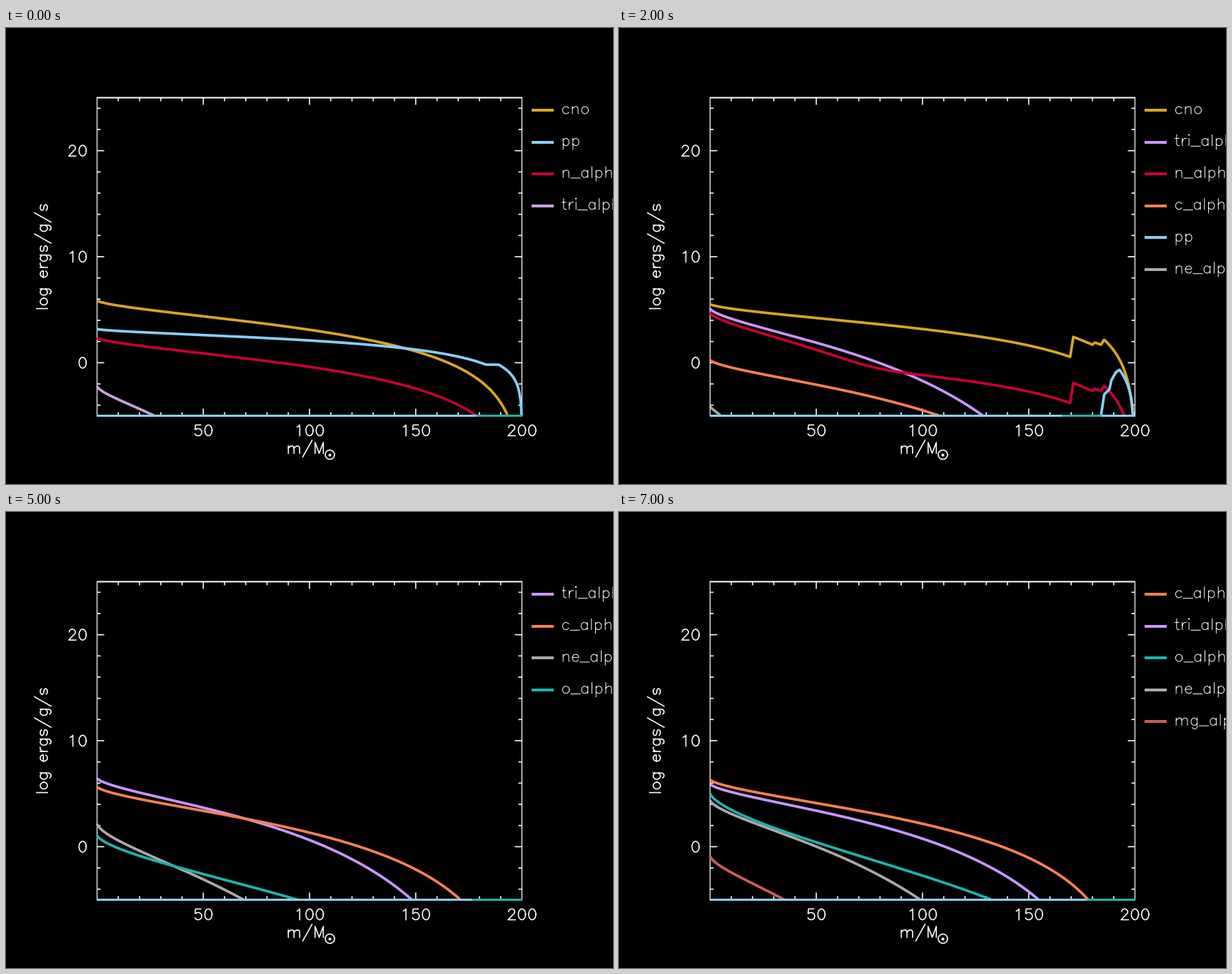
Write a matplotlib script that moves like this. It is 850 px wide and 638 px high and loops after 8000 ms.

```python
import numpy as np
import matplotlib.pyplot as plt
from matplotlib.animation import ArtistAnimation

W, H, DPI = 850, 638, 100
LEFT, RIGHT, TOP, BOTTOM = 127, 722, 97, 542
PX = 72 / DPI        # one pixel in points
UNIT = 0.72          # pixels per glyph unit
MASS, FLOOR, EMPTY = 200, -5, -9

COLORS = {
    "cno": "#daa520", "pp": "#87cefa", "n_alpha": "#c80032",
    "tri_alpha": "#c896ff", "c_alpha": "#ff7f50", "ne_alpha": "#a9a9a9",
    "o_alpha": "#20b2aa", "mg_alpha": "#cd5c5c",
}
PALE_LILAC = "#c8a2d8"
STACK = ["tri_alpha", "cno", "n_alpha", "c_alpha", "ne_alpha", "o_alpha",
         "mg_alpha", "pp"]

fig = plt.figure(figsize=(W / DPI, H / DPI), dpi=DPI, facecolor="black")
ax = fig.add_axes([0, 0, 1, 1])
ax.set_xlim(-0.5, W - 0.5)
ax.set_ylim(H - 0.5, -0.5)
ax.axis("off")


def to_x(m):
    return LEFT + m * (RIGHT - LEFT) / MASS


def to_y(e):
    return BOTTOM - (e - FLOOR) * (BOTTOM - TOP) / 30


# ---- stroke lettering: units with y up, baseline at 0 ----
def path(*v):
    return np.array(v, float).reshape(-1, 2)


def arc(cx, cy, rx, ry, a0, a1):
    a = np.radians(np.linspace(a0, a1, 25))
    return np.column_stack([cx + rx * np.cos(a), cy + ry * np.sin(a)])


def join(*parts):
    return np.vstack(parts)


stem = path(4, 0, 4, 14)
tall = path(4, 0, 4, 21)
arch = path(4, 10, 7, 13, 9, 14, 12, 14, 14, 13, 15, 10, 15, 0)
bowl = join(path(15, 11), arc(9, 7, 6, 7, 40, 320), path(15, 3))

# character: (advance, strokes)
GLYPHS = {
    " ": (16, []),
    "l": (8, [tall]),
    "i": (8, [stem, path(3, 21, 4, 22, 5, 21, 4, 20, 3, 21)]),
    "o": (19, [arc(9.5, 7, 6.5, 7, 0, 360)]),
    "c": (18, [arc(9.5, 7, 6.5, 7, 35, 325)]),
    "e": (18, [join(path(3, 8, 15, 8), arc(9.3, 7, 6.3, 7, 20, 325))]),
    "a": (19, [path(15, 0, 15, 14), bowl]),
    "g": (19, [join(path(15, 14), arc(10, -2, 5, 5, 0, -150)), bowl]),
    "p": (19, [path(4, 14, 4, -7),
               join(path(4, 11), arc(9.5, 7, 6, 7, 140, -140), path(4, 3))]),
    "n": (19, [stem, arch]),
    "h": (19, [tall, arch]),
    "m": (30, [stem, arch, arch + [11, 0]]),
    "r": (13, [stem, path(4, 8, 5, 11, 7, 13, 9, 14, 12, 14)]),
    "t": (12, [path(5, 21, 5, 4, 6, 1, 8, 0, 10, 0), path(2, 14, 9, 14)]),
    "s": (17, [join(arc(8.5, 10.5, 5.5, 3.5, 20, 250),
                    arc(8.5, 3.5, 5.5, 3.5, 70, -160))]),
    "/": (22, [path(20, 25, 2, -7)]),
    "_": (18, [path(0, -1, 18, -1)]),
    "M": (24, [path(4, 0, 4, 21, 12, 0, 20, 21, 20, 0)]),
    "0": (20, [arc(10, 10.5, 7, 10.5, 0, 360)]),
    "1": (20, [path(6, 17, 8, 18, 11, 21, 11, 0)]),
    "2": (20, [join(arc(10, 15.5, 6, 5.5, 175, -30), path(3, 0, 17, 0))]),
    "5": (20, [join(path(15, 21, 5, 21, 4, 12),
                    arc(10, 7, 7, 7, 125, -150))]),
}


def write(text, x, y, width=1.6, align=0, upright=False):
    """Draw text at baseline (x, y); align is the share of it left of x."""
    gap = path(np.nan, np.nan)
    pen, strokes = 0, []
    for ch in text:
        advance, parts = GLYPHS[ch]
        for part in parts:
            strokes += [part + [pen, 0], gap]
        pen += advance
    u, v = (np.vstack(strokes) - [align * pen, 0]).T * UNIT
    xs, ys = (x - v, y - u) if upright else (x + u, y - v)
    return ax.plot(xs, ys, color="white", lw=width * PX, snap=False)[0]


# ---- fixed parts ----
def segment(x0, y0, x1, y1, color="white", width=1.6, snap=False):
    return ax.plot([x0, x1], [y0, y1], color=color, lw=width * PX,
                   solid_capstyle="butt", snap=snap)[0]


def draw_axes():
    for y in (TOP, BOTTOM):
        segment(LEFT - 0.5, y, RIGHT + 0.5, y, width=2)
    for x in (LEFT, RIGHT):
        segment(x, TOP, x, BOTTOM, width=1.2)
    for m in range(10, MASS, 10):
        x, size = to_x(m), 5 if m % 50 else 10
        segment(x, TOP, x, TOP + size)
        segment(x, BOTTOM, x, BOTTOM - size)
    for e in range(-4, 25, 2):
        y, size = to_y(e), 5 if e % 10 else 10
        segment(LEFT, y, LEFT + size, y)
        segment(RIGHT, y, RIGHT - size, y)
    for e in (0, 10, 20):
        write(str(e), 114, to_y(e) + 7.5, align=1)
    for m in (50, 100, 150, 200):
        write(str(m), to_x(m), 570, align=0.5)
    write("log ergs/g/s", 57.5, 319.7, align=0.5, upright=True)
    write("m/M", 392, 594.5)
    ax.plot(*arc(453, 596.5, 6.5, 6.5, 0, 360).T, color="white", lw=1.6 * PX)
    ax.plot([453], [596.5], "o", color="white", ms=4 * PX, mew=0)


# ---- burning rates, log ergs/g/s over the mass grid ----
mass = np.linspace(0, MASS, 10001)


def falloff(m):
    """The two ways a rate drops outwards: central cusp and thin surface."""
    u = np.minimum(m / MASS, 0.9995)
    return u ** 0.65, -np.log(1 - u) - u


def core(e0, m1, e1, m2, e2=FLOOR):
    """Rate e0 at the centre, through (m1, e1), ending at (m2, e2)."""
    a, b = np.linalg.solve([falloff(m1), falloff(m2)], [e0 - e1, e0 - e2])
    cusp, edge = falloff(mass)
    return np.where(mass <= m2, e0 - a * cusp - b * edge, EMPTY)


def shell(k, *keys, inside=EMPTY):
    """Steps through the key points, then a logarithmic fall to the surface."""
    m, e = path(*keys).T
    left = np.maximum(MASS - mass, 0.01)
    tail = e[-1] + k * np.log(left / (MASS - m[-1]))
    out = np.where(mass < m[-1], np.interp(mass, m, e), tail)
    return np.where(mass < m[0], inside, out)


def mix(a, b):
    return np.log10(10 ** a + 10 ** b)


class Scene:
    """One moment: rates in legend order, plus the teal parts of the floor."""

    def __init__(self, rates, *floor, **recolor):
        self.rates, self.floor = rates, floor
        self.colors = {**COLORS, **recolor}

    def draw(self):
        art = []
        for name in sorted(self.rates, key=STACK.index):
            e = self.rates[name]
            e = np.where(e < FLOOR, np.nan, e)
            art += ax.plot(to_x(mass), to_y(e), color=self.colors[name],
                           lw=3.7 * PX, solid_capstyle="butt",
                           solid_joinstyle="round")
        art.append(segment(LEFT, BOTTOM, RIGHT, BOTTOM, COLORS["pp"], 3))
        for x0, x1 in self.floor:
            art.append(segment(x0, BOTTOM, x1, BOTTOM, COLORS["o_alpha"], 3))
        for row, name in enumerate(self.rates):
            y = 114.5 + 44.6 * row
            art.append(segment(736, np.floor(y) + 0.5, 767, np.floor(y) + 0.5,
                               self.colors[name], 4, snap=True))
            art.append(write(name, 776.8, y + 5, width=1))
        return art


late_cno = shell(2.7, 169.5, 0.55, 171, 2.44, 180, 1.7, 181, 1.9, 184, 1.7,
                 185.5, 2.17, inside=core(5.54, 100, 3.18, 169.5, 0.55))

scenes = [
    Scene({
        "cno": core(5.88, 100, 3.11, 193.3),
        "pp": shell(1.2, 183, -0.18, 189, -0.18,
                    inside=core(3.18, 100, 2.1, 183, -0.18)),
        "n_alpha": core(2.37, 100, -0.39, 178.5),
        "tri_alpha": core(-2.2, 12.5, -3.69, 27),
    }, (658, 722), tri_alpha=PALE_LILAC),
    Scene({
        "cno": core(5.94, 100, 3.18, 195),
        "n_alpha": core(3.65, 100, -0.05, 181.5),
        "pp": shell(1.2, 183, -0.4, 189, -0.4,
                    inside=core(2.9, 100, 1.83, 183, -0.4)),
        "tri_alpha": core(1.36, 38, -1.94, 72),
    }, (672, 722)),
    Scene({
        "cno": late_cno,
        "tri_alpha": core(5.13, 60, 1.3, 128.5),
        "n_alpha": mix(core(4.73, 50, 1.2, 115), late_cno - 4.35),
        "c_alpha": core(0.28, 50, -2.07, 108),
        "pp": shell(1.9, 184, -5, 185.5, -3, 188, -2.5, 188.8, -1.7,
                    191, -0.9, 192.7, -0.66),
        "ne_alpha": core(-4.1, 2, -4.5, 5),
    }, (620, 675)),
    Scene({
        "cno": shell(3.1, 84.6, -5, 88, -3.2, 89.5, -1.5, 91, 6.48, 125, 5.5,
                     152.5, 4.26, 154.5, 6.2, 157, 6.5, 158, 7.09),
        "n_alpha": shell(3.3, 90.3, -0.85, 91.3, 1.5, 125, 0.6, 152.5, -0.72,
                         154.5, 1.3, 157, 1.6, 158, 2.7, 162, 2.9,
                         inside=core(6.01, 50, 2.37, 90.3, -0.85)),
        "tri_alpha": core(5, 50, 1.63, 121),
        "c_alpha": core(2.78, 50, 0.42, 136),
        "pp": shell(2.15, 157.3, -5, 158, -3.35, 160.7, -2.6, 161.7, -0.9,
                    162.3, -0.39, 176, -1.75, 190, -3.9, 191.3, -3,
                    193, -2.95),
        "ne_alpha": core(-1.53, 12.5, -3.82, 24.3),
        "o_alpha": core(-4.16, 3.5, -4.63, 8.2),
    }, (362, 380), (580, 596)),
    Scene({
        "tri_alpha": core(5.94, 50, 2.78, 128.5),
        "n_alpha": shell(3.6, 147.5, -5, 148.5, -3.1, 151, -2.5, 152.5, -1.8,
                         155, 1.4, 156.7, 2.3, 158.3, 2.4,
                         inside=core(5.94, 50, 2.37, 120.7)),
        "cno": shell(3.2, 142.8, -5, 145.5, -3.5, 147.2, -1.1, 148.6, 1.7,
                     150, 1.9, 152.3, 2.7, 154, 4.7, 155.7, 5.6, 157.7, 5.88),
        "c_alpha": core(3.45, 50, 1.03, 141),
        "ne_alpha": core(0.56, 24.4, -2.54, 46),
        "o_alpha": core(-3, 14.3, -4.36, 25.7),
        "pp": shell(2.6, 156.3, -5, 158, -4.4, 159.7, -4.22),
    }, (558, 592)),
    Scene({
        "tri_alpha": core(6.48, 75, 2.34, 148.2),
        "c_alpha": core(5.67, 75, 2.44, 171),
        "ne_alpha": core(2.17, 38.2, -2, 69),
        "o_alpha": core(1.09, 38.2, -1.94, 94.4),
    }, (652, 722)),
    Scene({
        "c_alpha": core(6.28, 100, 1.97, 176.5),
        "tri_alpha": core(6.08, 100, 0.76, 153.5),
        "o_alpha": core(4.26, 50, -0.12, 126),
        "ne_alpha": core(3.85, 50, -0.6, 92),
        "mg_alpha": core(-2.07, 11, -3.7, 24.5),
    }, (655, 722)),
    Scene({
        "c_alpha": core(6.35, 100, 2.17, 178),
        "tri_alpha": core(5.94, 100, 0.76, 154.7),
        "o_alpha": core(5.07, 50, 0.42, 132.5),
        "ne_alpha": core(4.4, 50, 0.02, 99),
        "mg_alpha": core(-0.86, 11, -2.54, 35),
    }, (655, 722)),
]

draw_axes()
anim = ArtistAnimation(fig, [s.draw() for s in scenes], interval=1000,
                       repeat=True, repeat_delay=0)
plt.show()
```
